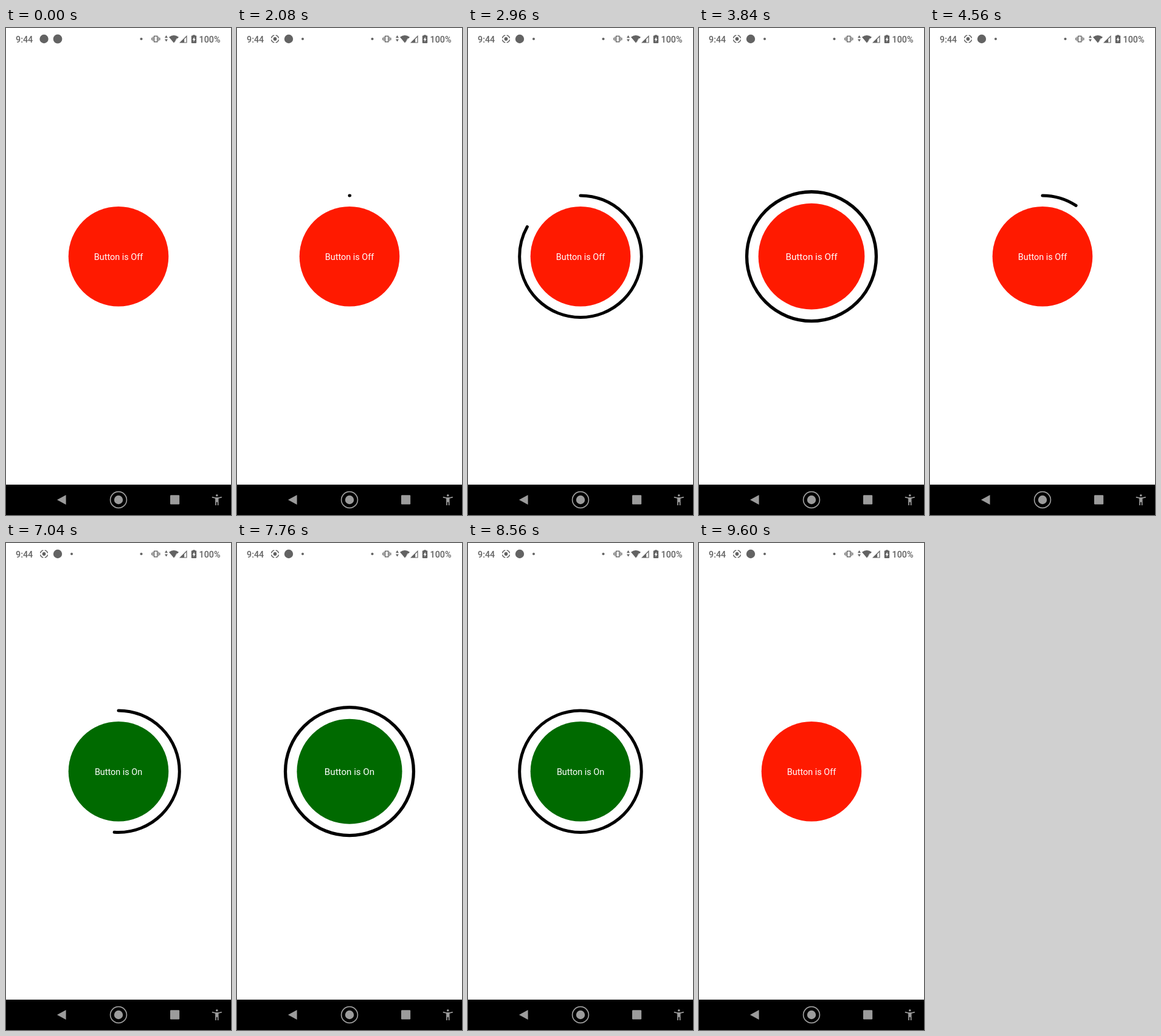
Recreate the animation shown at these times as an HTML page with a canvas. Size 370 by 802 pixels, loop 9680 ms.

```html
<!DOCTYPE html>
<html lang="en">
<head>
<meta charset="utf-8">
<title>Hold button</title>
<style>
  html, body { margin: 0; width: 100%; height: 100%; overflow: hidden; background: #fff; }
  canvas { display: block; width: 370px; height: 802px; }
</style>
</head>
<body>
<canvas id="stage" width="370" height="802"></canvas>
<script>
const ctx = document.getElementById('stage').getContext('2d');
const LOOP = 9680;
const PRESSES = [2080, 6480];
const GREY = '#636363', NAV = '#9c9c9c', RED = '#ff1a00', GREEN = '#006a00';
const TAU = Math.PI * 2;

const clamp = v => Math.min(1, Math.max(0, v));
const ramp = (t, start, length) => clamp((t - start) / length);
const easeInOut = t => t < 0.5 ? 2 * t * t : 1 - 2 * (1 - t) * (1 - t);
const mix = (a, b, t) => a + (b - a) * t;

function disc(x, y, r, color) {
  ctx.fillStyle = color;
  ctx.beginPath();
  ctx.arc(x, y, r, 0, TAU);
  ctx.fill();
}

function arc(x, y, r, from, to, width, color) {
  ctx.strokeStyle = color;
  ctx.lineWidth = width;
  ctx.beginPath();
  ctx.arc(x, y, r, from, to);
  ctx.stroke();
}

function poly(color, ...points) {
  ctx.fillStyle = color;
  ctx.beginPath();
  points.forEach(([x, y]) => ctx.lineTo(x, y));
  ctx.fill();
}

function rect(x, y, w, h, color) {
  ctx.fillStyle = color;
  ctx.fillRect(x, y, w, h);
}

function label(text, x, y, font, color, align) {
  ctx.font = font + ' Roboto, sans-serif';
  ctx.fillStyle = color;
  ctx.textAlign = align;
  ctx.fillText(text, x, y);
}

function recordIcon(x, y, size) {
  ctx.save();
  ctx.translate(x, y);
  ctx.scale(size, size);
  disc(0, 0, 2.9, GREY);
  for (let i = 0; i < 4; i++) {
    const mid = i * TAU / 4 + TAU / 8;
    arc(0, 0, 6.1, mid - 0.58, mid + 0.58, 1.4, GREY);
  }
  ctx.restore();
}

function notifications(t) {
  const shift = easeInOut(ramp(t, 40, 560));
  if (shift > 0) recordIcon(62.5, 18, shift);
  disc(mix(62.5, 85, shift), 18, 7.2, GREY);
  disc(mix(85, 108, shift), 18, mix(7.4, 2, shift), GREY);
}

function vibrateIcon() {
  ctx.strokeStyle = GREY;
  ctx.lineWidth = 1.4;
  ctx.strokeRect(243.6, 13.4, 5.2, 9.4);
  rect(241, 14.5, 1.2, 7, GREY);
  rect(250.3, 14.5, 1.2, 7, GREY);
  rect(239, 16, 1.2, 4, GREY);
  rect(252.3, 16, 1.2, 4, GREY);
}

function networkIcons() {
  poly(GREY, [261, 16.2], [263.5, 12], [266, 16.2]);
  poly(GREY, [261, 18.4], [263.5, 22.6], [266, 18.4]);

  ctx.fillStyle = GREY;
  ctx.beginPath();
  ctx.moveTo(268, 15);
  ctx.quadraticCurveTo(276, 9, 284, 15);
  ctx.lineTo(276, 24.5);
  ctx.fill();
  label('4', 280.4, 21.5, '500 7px', '#fff', 'center');

  poly(GREY, [285, 24.6], [297.6, 12], [297.6, 24.6]);
  poly('#fff', [293.2, 18.2], [296.4, 15], [296.4, 23.4], [293.2, 23.4]);
}

function batteryIcon() {
  rect(307, 11.5, 4, 2, GREY);
  ctx.fillStyle = GREY;
  ctx.beginPath();
  ctx.roundRect(304.8, 12.6, 8.4, 12.4, 1);
  ctx.fill();
  poly('#fff', [309.8, 14.8], [306.6, 19.6], [308.5, 19.6], [308.5, 23], [311.5, 18], [309.8, 18]);
}

function statusBar(t) {
  label('9:44', 16, 23.5, '500 14.3px', GREY, 'left');
  notifications(t);
  disc(222.5, 18, 2.1, GREY);
  vibrateIcon();
  networkIcons();
  batteryIcon();
  label('100%', 317.5, 23.5, '500 14.3px', GREY, 'left');
}

function navigationBar() {
  rect(0, 752, 370, 50, '#000');
  poly(NAV, [84, 777], [98.6, 769], [98.6, 785]);
  arc(185, 777, 13.4, 0, TAU, 1.7, NAV);
  disc(185, 777, 7.2, NAV);
  ctx.fillStyle = NAV;
  ctx.beginPath();
  ctx.roundRect(270, 769.3, 15.2, 15.2, 1.2);
  ctx.fill();

  disc(346.8, 769.7, 1.8, NAV);
  poly(NAV, [339, 771.8], [344, 773], [349.6, 773], [354.6, 771.8], [355, 773.4], [349.5, 774.8],
    [349.5, 786], [347.8, 786], [347.8, 780.8], [345.8, 780.8], [345.8, 786], [344.1, 786],
    [344.1, 774.8], [338.6, 773.4]);
}

function pressState(t) {
  const grow = ramp(t, 50, 1000);
  const pulse = easeInOut(ramp(t, 1033, 500)) - easeInOut(ramp(t, 1533, 500));
  const shrink = easeInOut(ramp(t, 2065, 530));
  return {
    ringVisible: t >= 0 && shrink < 1,
    progress: Math.max(0.001, grow - shrink),
    scale: 1 + 0.105 * pulse,
    done: t >= 2610
  };
}

function button(t) {
  const presses = PRESSES.map(start => pressState(t - start));
  const current = presses[t < PRESSES[1] ? 0 : 1];
  const isOn = presses.filter(p => p.done).length === 1;

  ctx.save();
  ctx.translate(185, 376.2);
  ctx.scale(current.scale, current.scale);
  if (current.ringVisible) {
    ctx.lineCap = 'round';
    arc(0, 0, 100.3, -TAU / 4, TAU * (current.progress - 0.25), 5, '#000');
    ctx.lineCap = 'butt';
  }
  disc(0, 0, 82.3, isOn ? GREEN : RED);
  label(isOn ? 'Button is On' : 'Button is Off', 0, 5.6, '14.4px', '#fff', 'center');
  ctx.restore();
}

function draw(t) {
  rect(0, 0, 370, 802, '#fff');
  statusBar(t);
  button(t);
  navigationBar();
}

const begin = performance.now();
function tick() {
  draw((performance.now() - begin) % LOOP);
  requestAnimationFrame(tick);
}
tick();
</script>
</body>
</html>
```
